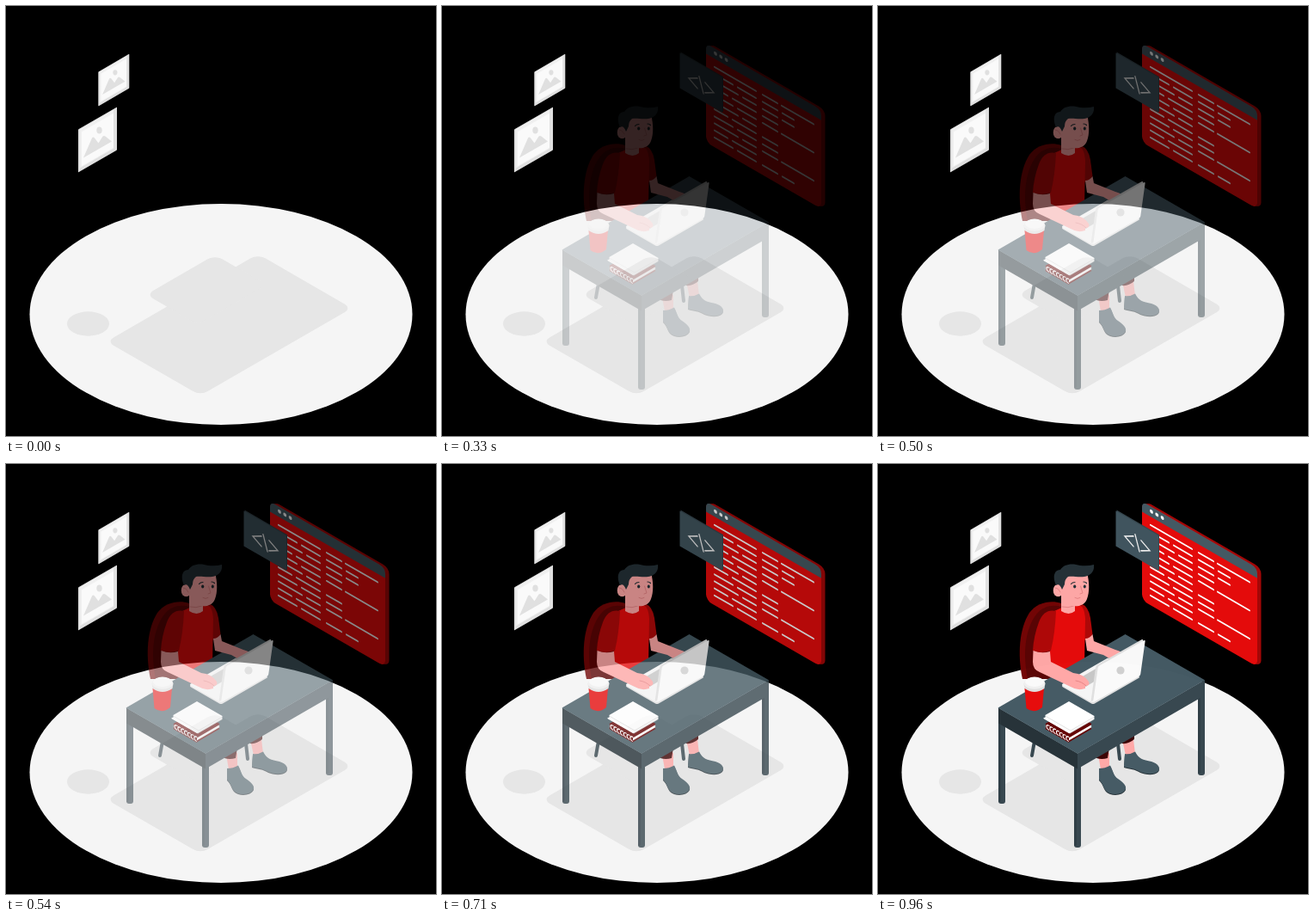
Write an HTML page that moves like this. It is 500x500 px and loops after 1 s.

```html
<!DOCTYPE html>
<html lang="en">
<head>
<meta charset="utf-8">
<title>Desk scene</title>
<style>
html, body { margin: 0; width: 100%; height: 100%; overflow: hidden; background: #000; }
svg { display: block; width: 100%; height: 100%; }
.line { fill: none; stroke-linecap: round; }
</style>
</head>
<body>
<svg id="stage" viewBox="0 0 500 500"></svg>
<script>
const SLATE = "#455a64", STEEL = "#37474f", INK = "#263238";
const RED = "#e60c0c", WINE = "#a60808", MAROON = "#650505";
const SKIN = "#ffa8a7", BLUSH = "#e88687", GREY = "#e0e0e0", PAPER = "#fafafa";

// isometric planes: floor, wall falling to the right, wall rising to the right
const plane = axes => (x, y, body) => `<g transform="matrix(${axes} ${x} ${y})">${body}</g>`;
const floor = plane("1 .577 -1 .577");
const fall = plane("1 .577 0 1");
const rise = plane("1 -.577 0 1");

const rect = (x, y, w, h, fill, r = 0) =>
  `<rect x="${x}" y="${y}" width="${w}" height="${h}" rx="${r}" fill="${fill}"/>`;
const oval = (x, y, rx, ry, fill) =>
  `<ellipse cx="${x}" cy="${y}" rx="${rx}" ry="${ry}" fill="${fill}"/>`;
const shape = (fill, d) => `<path fill="${fill}" d="${d}"/>`;
const line = (color, width, d) =>
  `<path class="line" stroke="${color}" stroke-width="${width}" d="${d}"/>`;
const repeat = (n, draw) => Array.from({ length: n }, (_, i) => draw(i)).join("");

const picture = (x, y, size) => rise(x, y, `<g transform="scale(${size})">` +
  rect(0, 0, 45, 50, GREY, .8) + rect(2, 1, 39, 45, "#f0f0f0") + rect(4, 5, 37, 40, PAPER) +
  "</g>") + `<g transform="translate(${x} ${y}) scale(${size})">` +
  shape(GREY, "M6 33L16 10Q17.500 8 19 10L23.500 16L28.500 8Q30 7 31.500 8L39 14Z") +
  oval(24.5, 1, 3.2, 3.9, GREY) + "</g>";

const ground =
  oval(250, 358.5, 222.5, 128.5, "#f5f5f5") +
  floor(293, 288.5, rect(0, 0, 109, 176, "#e6e6e6", 8)) +
  floor(243, 289.5, rect(0, 0, 60, 80, "#e6e6e6", 8)) +
  oval(95.5, 369.5, 24.5, 14.2, "#e6e6e6") +
  picture(84, 143.5, 1) + picture(107.3, 76.5, .8);

// rows of code: a split left column, short middle pieces, a few right pieces
const dash = (row, from, to) => `M${from} ${row * 8.2}H${to}`;
function codeRow(row) {
  const gap = 15 + row * 7 % 3 * 6;
  let d = row ? dash(row, 0, gap) + dash(row, gap + 6, 48) : dash(row, 0, 48);
  if (row % 4 != 1 || row < 4) d += dash(row, 56, 73);
  if (row % 4 == 0) d += dash(row, 78, 115);
  else if (row < 3 || row > 9) d += dash(row, 79, 92);
  return d;
}

const browser = fall(307, 43.5,
  repeat(3, i => rect(4.5 - 1.5 * i, .9 * i - 2.7, 134, 115, WINE, 7)) +
  rect(0, 0, 134, 115, RED, 7) +
  shape(SLATE, "M0 12V7Q0 0 7 0H127Q134 0 134 7V12Z") +
  repeat(3, i => oval(11 + 6.3 * i, 5.5, 1.9, 2.1, "#fff"))) +
  fall(317, 71, line("#fff", 2, repeat(11, codeRow))) +
  fall(276.5, 54.5, rect(1, -1.5, 49.5, 41, STEEL) + rect(0, 0, 49.5, 41, "#41555f")) +
  fall(287, 84, line("#f0f0f0", 1.5, "M10 -6L0 0L10 6M12 -9L17 8M19 -6L29 0L19 6"));

const chair =
  shape("#730606", "M168 250C162 222 164 192 176 173C185 161 201 158 213 162L210 250Z") +
  shape("#5a0505", "M174 250C168 220 171 192 184 175C192 165 203 163 214 166V250Z") +
  line(STEEL, 4, "M182 322L179 339M279 325L281 343");

const shoes = "M257 354Q264 354 270 350.500C274 358 274 363 279 366C285 370 289 374 288 378" +
  "C285 385 271 386 265 380C261 374 262 372 257 367Z" +
  "M287 337Q293 338 299 334.500C303 343 308 344 318 346C325 348 329 353 326 357" +
  "C321 362 310 360 305 358C299 354 293 354 286 352Z";
const feet =
  shape(SKIN, "M256 338L269 336V353L259 355ZM285 325L297 320L299 337L288 339Z") +
  shape("#3d0405", "M252 336L269 330L267 342Q260 344 254 342ZM282 322L298 313V320Q291 326 284 325Z") +
  `<g transform="translate(0 1)">${shape(INK, shoes)}</g>` + shape(SLATE, shoes);

const body =
  shape("#b00909", "M236 162Q245 166 247 179L249.500 198Q246 204 239 205Z") +
  shape(RED, "M205 171L216 166L233 163Q240 165 241 180L240 235L204 249Q198 238 200 214Z") +
  shape("#b00909", "M207 171Q193 168 187 184Q181 200 180 217Q190 221 201 217Q206 196 207 171Z") +
  shape(SKIN, "M213 150L229 160V171Q222 177 213 171Z") +
  line(BLUSH, 1, "M214 166Q221 168 228 165") +
  shape(SKIN, "M214 130L243 126C246 138 246 149 243 157C240 165 232 166 226 165C218 164 214 158 213 150Z") +
  oval(209.5, 147, 5.8, 7.3, SKIN) + line(BLUSH, 1, "M206.500 144Q210 144 212 149") +
  shape(INK, "M207 141C203 133 204 123 212 123C216 116 226 115 235 118Q244 119 251 117" +
    "C252 125 247 130 240 131C233 132 226 130 221 131Q217 134 217 140L214 146Q211 138 207 141Z") +
  oval(228.7, 142.5, 1.6, 1.9, INK) + oval(240.3, 142.5, 1.5, 1.9, INK) +
  line(INK, 1.2, "M224.500 139.500Q226 137.500 229 137.500M239 137Q241 137 242.500 138.500") +
  line(BLUSH, 1, "M235.500 142L238 150L235 151M229 155.500Q232 157.500 235 155.500");

const leg = (x, y) => rect(x, y, 8, 98, STEEL, 3) + rect(x, y, 3, 96, "#2f3e46", 1.5);
const table =
  leg(140, 297) + leg(372, 264) + leg(228, 348) +
  fall(140, 283.5, rect(0, 0, 92, 18, INK)) +
  rise(232, 336.5, rect(0, 0, 148, 18, STEEL)) +
  floor(287.5, 198, rect(0, 0, 92.5, 148, SLATE));

const arms =
  shape(SKIN, "M241 203Q246 203 249.500 198L251 206L276 216Q284 218 288 223Q281 225 276 229Q268 226 262 222L243 217Z") +
  shape(SKIN, "M180.500 217Q190 221 200 218L201 230L227 243Q239 244 245 253Q247 258 241 258L241 261Q232 264 224 259L188 242Q180 239 180 230Z") +
  line(BLUSH, 1, "M230 252Q237 253 242 258");

const screen = plane("1 -.57 .14 -1");
const laptop =
  floor(268, 226.5, rect(0, 0, 37, 55, GREY, 2)) +
  floor(268, 225, rect(0, 0, 36, 55, "#f5f5f5", 2) + rect(4, 10, 12, 38, "#c7c7c7")) +
  arms +
  screen(247.5, 276.5, rect(0, 0, 55, 42, GREY, 2)) +
  screen(250, 277.5, rect(0, 0, 55, 42, PAPER, 2)) +
  oval(282, 240, 4.6, 4.6, "#d0d0d0");

const cup =
  shape(RED, "M170.500 261H193L191 283Q181.500 291 172.500 284Z") +
  shape(GREY, "M169.500 255H194.500L193.500 261Q182 269 170.500 261Z") +
  oval(182, 255, 12.3, 6.8, "#f0f0f0") + oval(182, 253.3, 10.8, 5.7, PAPER);

const books =
  repeat(7, i => floor(221.5, 292.5 - i, rect(0, 0, 27, 27, i > 1 && i < 5 ? "#fff" : MAROON))) +
  fall(195, 302, rect(0, 0, 27, 6, MAROON) +
    line("#fff", 1.2, repeat(7, i => `M${4 + i * 3.8} 0q-4 0 -2.500 4.500l2 .5`))) +
  floor(222, 279.5, rect(0, 0, 30, 29, "#d8d8d8")) +
  floor(222, 278.5, rect(0, 0, 30, 30, "#fff")) +
  floor(222, 277, rect(0, 0, 30, 28, GREY)) + floor(222, 276, rect(0, 0, 30, 28, "#fff"));

const stage = document.getElementById("stage");
stage.innerHTML = ground +
  `<g id="scene" opacity="0">${browser + chair + feet + body + table + laptop + cup + books}</g>`;
const scene = document.getElementById("scene");

// sine fade-in, held at 24 steps per second
const start = performance.now();
function draw(now) {
  const time = Math.max(0, now - start) % 1000;
  const step = Math.floor((time + 4) * 24 / 1000) % 24;
  const t = Math.max(0, step - 1) / 23;
  scene.setAttribute("opacity", (1 - Math.cos(Math.PI * t)) / 2);
  requestAnimationFrame(draw);
}
requestAnimationFrame(draw);
</script>
</body>
</html>
```
